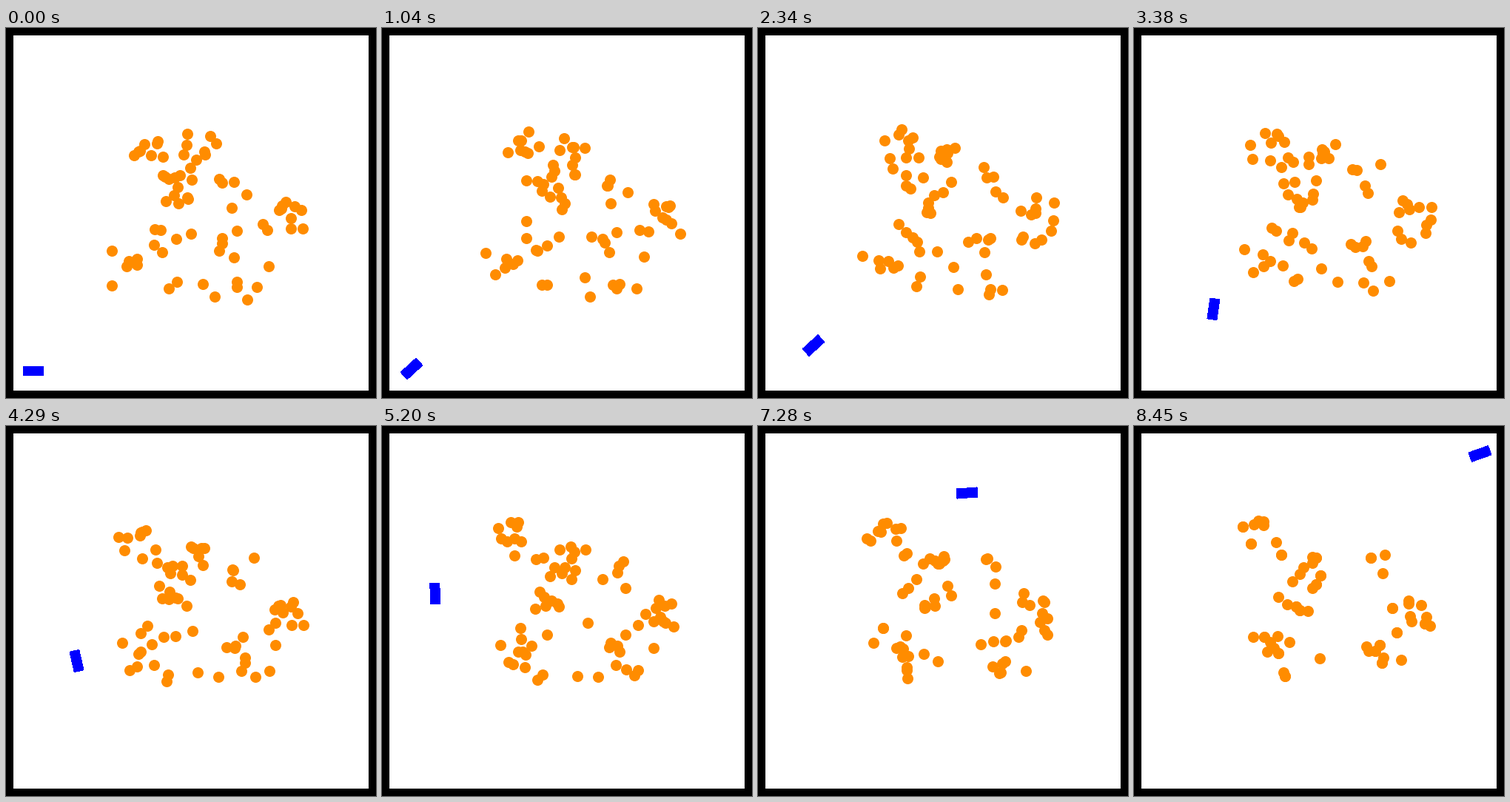
A matplotlib script that plays this animation: 500x500 px, repeating every 8.58 s.

```python
import numpy as np
import matplotlib.pyplot as plt
from matplotlib.animation import FuncAnimation
from matplotlib.patches import Polygon, Rectangle

SIZE, DPI = 500, 100
FRAMES, INTERVAL = 66, 130
ORANGE, BLUE = "#ff8c00", "#0000ff"
DOT = 15
LENGTH, WIDTH = 28, 13
TURN = 6  # degrees per frame while the robot turns on the spot

# Dots, spread, centre at the start and at the end of the loop
FLOCKS = [
    (8, 13, (259, 160), (245, 178)),
    (11, 18, (202, 178), (174, 148)),
    (10, 18, (236, 214), (226, 230)),
    (5, 20, (302, 225), (322, 195)),
    (11, 18, (372, 256), (364, 252)),
    (6, 16, (225, 280), (192, 288)),
    (5, 15, (290, 284), (320, 297)),
    (5, 22, (338, 335), (362, 298)),
    (4, 28, (250, 358), (228, 345)),
    (6, 18, (147, 318), (172, 302)),
]
LOW, HIGH = np.array([116, 127]), np.array([402, 378])

# Robot path: frame, x, y
PATH = np.array([
    (6, 37.3, 463), (8, 40, 460.5), (18, 75, 429), (21, 92.5, 413),
    (28, 108, 364), (33, 95.5, 317.5), (42, 75.5, 200), (47, 117, 138),
    (52, 199, 91), (56, 282.5, 90.5), (60, 366, 78), (63, 429.5, 51),
    (65, 467.5, 37.5),
])
TIMES, POINTS = PATH[:, 0], PATH[:, 1:]
SLOPES = np.gradient(POINTS, TIMES, axis=0)

rng = np.random.default_rng(7)
counts = [flock[0] for flock in FLOCKS]
spread = np.repeat([flock[1] for flock in FLOCKS], counts)[:, None]
start = np.repeat([flock[2] for flock in FLOCKS], counts, axis=0)
end = np.repeat([flock[3] for flock in FLOCKS], counts, axis=0)
offset = spread * rng.uniform(-1.5, 1.5, start.shape)
phase = rng.uniform(0, 2 * np.pi, start.shape)
pace = 2 * np.pi / rng.uniform(24, 46, start.shape)
reach = rng.uniform(4, 13, start.shape)


def dots_at(frame):
    u = frame / (FRAMES - 1)
    pos = start + u * (end - start) + offset + reach * np.sin(phase + pace * frame)
    # Some neighbours slowly run together
    pos[1::4] += u ** 1.5 * (pos[0:-1:4] - pos[1::4])
    # Turn back at the edges of the field
    pos = LOW + np.abs(pos - LOW)
    pos = HIGH - np.abs(HIGH - pos)
    return np.round(pos) + 0.5


def path_at(t):
    """Cubic Hermite curve through the path points."""
    t = max(t, TIMES[0])
    i = min(np.searchsorted(TIMES, t, side="right") - 1, len(TIMES) - 2)
    h = TIMES[i + 1] - TIMES[i]
    u = (t - TIMES[i]) / h
    return ((1 + 2 * u) * (1 - u) ** 2 * POINTS[i]
            + u * (1 - u) ** 2 * h * SLOPES[i]
            + u * u * (3 - 2 * u) * POINTS[i + 1]
            + u * u * (u - 1) * h * SLOPES[i + 1])


def robot_at(frame):
    # Face along the path, once the first turn is done
    t = np.clip(frame, TIMES[0] + 0.1, TIMES[-1] - 0.1)
    dx, dy = path_at(t + 0.1) - path_at(t - 0.1)
    angle = min(np.radians(TURN * frame), np.arctan2(-dy, dx))
    along = np.array([np.cos(angle), -np.sin(angle)]) * LENGTH / 2
    across = np.array([np.sin(angle), np.cos(angle)]) * WIDTH / 2
    return path_at(frame) + np.array([-along - across, along - across,
                                      along + across, across - along])


fig = plt.figure(figsize=(SIZE / DPI, SIZE / DPI), dpi=DPI, facecolor="black")
ax = fig.add_axes([0, 0, 1, 1])
ax.set_xlim(0, SIZE)
ax.set_ylim(SIZE, 0)
ax.axis("off")
ax.add_patch(Rectangle((10, 10), 480, 480, facecolor="white", lw=0))

dots = ax.scatter(*dots_at(0).T, s=(DOT * 72 / DPI) ** 2, c=ORANGE,
                  linewidths=0, antialiased=False, zorder=2)
robot = ax.add_patch(Polygon(robot_at(0), facecolor=BLUE, lw=0,
                             antialiased=False, zorder=3))


def draw(frame):
    dots.set_offsets(dots_at(frame))
    robot.set_xy(robot_at(frame))
    return dots, robot


anim = FuncAnimation(fig, draw, frames=FRAMES, interval=INTERVAL,
                     init_func=lambda: draw(0), repeat=True, repeat_delay=0)
plt.show()
```
